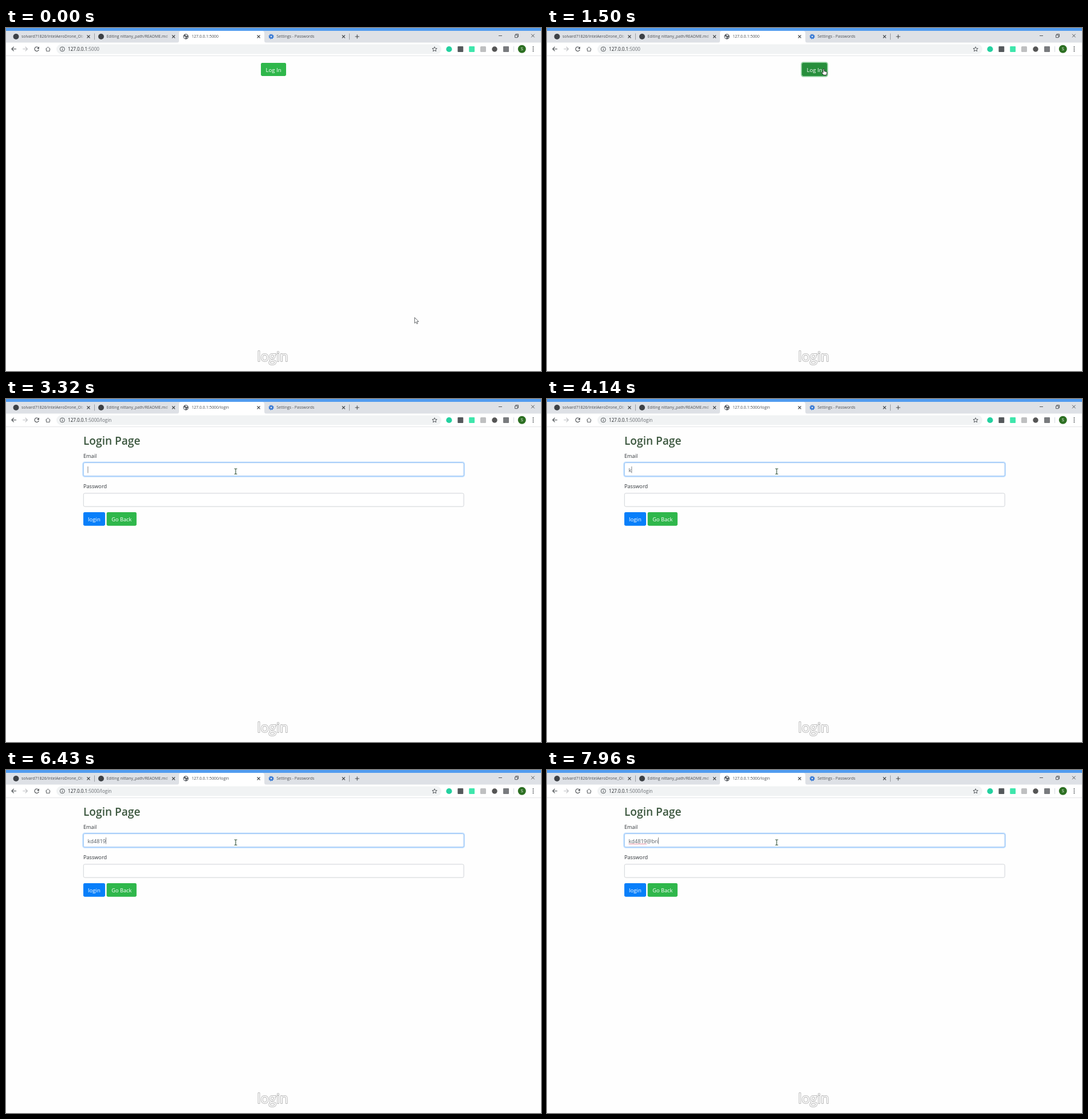
Animation, 934 px wide and 600 px high, one loop 8 s. Source, as an HTML page:

```html
<!DOCTYPE html>
<html lang="en">
<head>
<meta charset="utf-8">
<title>Login demo</title>
<style>
  html, body { margin: 0; width: 100%; height: 100%; overflow: hidden; background: #fefefe; }
  svg { display: block; font-family: "Open Sans", "Noto Sans", sans-serif; }
  text { white-space: pre; }
  .tab { font-size: 6.95px; fill: #4b4f54; }
  .url { font-size: 8.1px; fill: #6a6e73; }
  .label { font-size: 9.15px; fill: #2f3439; }
  .button { font-size: 9.6px; fill: #fff; }
  .typed { font-size: 9.25px; fill: #555c63; }
  .line { fill: none; stroke: #45494d; stroke-width: 1.1; }
  .field { fill: #fff; stroke: #cbcfd3; stroke-width: .9; }
  .caption { font-size: 23.8px; fill: #fff; stroke: #b9b9b9; stroke-width: 2; paint-order: stroke; stroke-linejoin: round; }
</style>
</head>
<body>
<svg width="934" height="600" viewBox="0 0 934 600">
  <defs>
    <linearGradient id="fade">
      <stop offset="0" stop-color="#dee1e6" stop-opacity="0"/>
      <stop offset="1" stop-color="#dee1e6"/>
    </linearGradient>
    <clipPath id="clip1"><path d="M20 5H135V25H20Z"/></clipPath>
    <clipPath id="clip2"><path d="M168 5H284V25H168Z"/></clipPath>
    <path id="cross" d="M-2.5-2.5 2.5 2.5M2.5-2.5-2.5 2.5" class="line"/>
  </defs>
  <rect width="934" height="600" fill="#fefefe"/>

  <!-- tab strip -->
  <rect width="934" height="26" fill="#dee1e6"/>
  <rect width="934" height="5" fill="#519cf0"/>
  <path d="M298 26Q302 26 302 22V9Q302 5 306 5H447Q451 5 451 9V22Q451 26 455 26Z" fill="#fff"/>
  <path d="M154.5 9.5V20.5M599.5 9.5V20.5" stroke="#9a9da2"/>
  <circle cx="17.5" cy="15" r="5" fill="#3d4146"/>
  <circle cx="166" cy="15" r="5" fill="#3d4146"/>
  <text class="tab" x="27" y="17.4" clip-path="url(#clip1)">solvard71826/IntelAeroDrone_Ob</text>
  <text class="tab" x="175.5" y="17.4" clip-path="url(#clip2)">Editing nittany_path/README.md</text>
  <path d="M129 8H136V22H129Z" fill="url(#fade)"/>
  <path d="M278 8H285V22H278Z" fill="url(#fade)"/>
  <g id="globe">
    <circle cx="314" cy="15" r="4.7" fill="#5a5e63"/>
    <path d="M310.3 14.5Q313 14 313.6 16T312 18.6Q310 17.3 310.3 14.5ZM313 11.3Q316 10.7 317 13L314.8 14.3 313.4 13ZM315.3 16.2 317.6 15.8 316 18.2Z" fill="#e8eaec"/>
  </g>
  <path id="spinner" d="M314 10.3A4.7 4.7 0 0 1 318.7 15" fill="none" stroke="#2f74dd" stroke-width="1.3"/>
  <text id="tabTitle" class="tab" x="324" y="17.4"></text>
  <g fill="none" stroke="#2f74d3">
    <circle cx="463" cy="15" r="2.5" stroke-width="2.1"/>
    <circle cx="463" cy="15" r="3.9" stroke-width="1.4" stroke-dasharray="1.53"/>
  </g>
  <text class="tab" x="472.3" y="17.4">Settings - Passwords</text>
  <use href="#cross" x="144" y="15"/><use href="#cross" x="292.5" y="15"/>
  <use href="#cross" x="441" y="15"/><use href="#cross" x="589.3" y="15"/>
  <path class="line" d="M609.5 15H616.7M613.1 11.4V18.6"/>
  <path class="line" style="stroke-width:.9" d="M860 13.5H866M888.5 12.2H893V16.7H888.5ZM889.8 12V10.7H894.4V15.3H893M917 10.7 922.6 16.3M922.6 10.7 917 16.3"/>

  <!-- toolbar -->
  <rect y="25.5" width="934" height="22.5" fill="#fff"/>
  <path d="M0 48.5H934" stroke="#e4e5e7"/>
  <rect x="88" y="28.5" width="672" height="17" rx="8.5" fill="#f1f3f4"/>
  <path class="line" d="M18 36.7H10.2M13.6 33 9.9 36.7 13.6 40.4"/>
  <path class="line" style="stroke:#b9bbbe" d="M29.3 36.7H37.2M33.7 33 37.4 36.7 33.7 40.4"/>
  <g id="reload">
    <path class="line" d="M56.6 34.5A3.7 3.7 0 1 0 57.2 37.8"/>
    <path d="M57.8 32.6V36.4H54Z" fill="#45494d"/>
  </g>
  <use id="stop" href="#cross" transform="translate(53.5 36.8) scale(1.25)"/>
  <path class="line" style="stroke-width:.9" d="M69.2 37 73.3 33.2 77.4 37M70.4 36.2V40.4H76.2V36.2"/>
  <circle class="line" style="stroke-width:.9" cx="98.3" cy="36.9" r="4"/>
  <path class="line" style="stroke-width:1" d="M98.3 36.3V39.2M98.3 34.4V35.4"/>
  <text class="url" x="108" y="39.9"><tspan fill="#24272b">127.0.0.1</tspan><tspan id="urlPath"></tspan></text>
  <path class="line" style="stroke-width:.9" d="M748.2 32.8 749.4 35.6 752.4 35.8 750.1 37.8 750.8 40.7 748.2 39.2 745.6 40.7 746.3 37.8 744 35.8 747 35.6Z"/>
  <circle cx="773.5" cy="37" r="5.1" fill="#24d1a0"/>
  <rect x="788.5" y="32" width="9.8" height="10" rx="1" fill="#55595c"/>
  <rect x="808.3" y="32" width="9.8" height="10" rx="1" fill="#3fe6ac"/>
  <rect x="828" y="32" width="10" height="10" rx="1.5" fill="#bfc0c1"/>
  <circle cx="853" cy="37" r="4.7" fill="#555"/>
  <rect x="868" y="32" width="10" height="10" rx="1" fill="#797b7e"/>
  <path d="M886.5 32V42" stroke="#d5d9df"/>
  <circle cx="900.7" cy="36.8" r="7" fill="#2d7023"/>
  <text x="900.7" y="39.4" text-anchor="middle" font-size="7.2" fill="#fff">S</text>
  <g fill="#45494d"><circle cx="920.4" cy="33.3" r="1"/><circle cx="920.4" cy="36.8" r="1"/><circle cx="920.4" cy="40.3" r="1"/></g>

  <!-- pages -->
  <g id="home">
    <rect id="homeRing" x="444.2" y="60.2" width="45.6" height="24.6" rx="3.2" fill="none" stroke="#28a745" stroke-width="1.9"/>
    <rect id="homeButton" x="445" y="61" width="44" height="23" rx="2.4"/>
    <text class="button" x="467" y="76.8" text-anchor="middle">Log In</text>
  </g>
  <g id="login">
    <text x="135" y="80.3" font-size="19.1" font-weight="600" fill="#3c573f">Login Page</text>
    <text class="label" x="135" y="103.2">Email</text>
    <rect id="emailRing" x="134.2" y="110.4" width="666" height="25.4" rx="3.3" fill="none" stroke="#bfdeff" stroke-width="1.9"/>
    <rect id="email" class="field" x="135.3" y="111.5" width="663.9" height="23.2" rx="2.4"/>
    <text id="typed" class="typed" x="142.6" y="127.5"></text>
    <path id="misspelt" fill="none" stroke="#e0708a" stroke-width=".8"/>
    <path id="caret" fill="none" stroke="#4a5056" stroke-width=".7"/>
    <text class="label" x="135" y="156.4">Password</text>
    <rect class="field" x="135.3" y="164.9" width="663.9" height="23.2" rx="2.4"/>
    <rect x="135" y="198" width="38" height="23.7" rx="2.4" fill="#087ffa"/>
    <text class="button" x="154" y="214" text-anchor="middle">login</text>
    <rect x="175.7" y="198" width="52.2" height="23.7" rx="2.4" fill="#2fb74b"/>
    <text class="button" style="font-size:9.25px" x="201.8" y="214" text-anchor="middle">Go Back</text>
  </g>

  <text class="caption" x="465.5" y="582.6" text-anchor="middle">login</text>

  <!-- pointers, with the hot spot at 0,0 -->
  <path id="arrow" d="M.4.4V10.4L2.7 8.2 4.2 11.6 5.8 10.9 4.4 7.6H7.4Z" fill="#fff" stroke="#55585c" stroke-width=".9"/>
  <path id="hand" d="M-1 1Q0-.6 1 1V4.5L4.8 5.4Q6 5.9 5.8 7.3L5 11.2H-.2L-3.2 7.5Q-3.2 5.9-1.8 6.4L-1 7.2Z" fill="#fff" stroke="#222" stroke-width=".9"/>
  <path id="beam" d="M-2.5-4.6H-.8L0-4 .8-4.6H2.5M0-4V4M-2.5 4.6H-.8L0 4 .8 4.6H2.5" fill="none" stroke="#34543a" stroke-width="1.1"/>
</svg>
<script>
const LOOP = 8000;
const BUSY_FROM = 1600, LOGIN_AT = 1740, BUSY_TO = 2600;
const CLICK_AT = 1330, FOCUS_AT = 2960;

// time, x, y of the pointer; eased between neighbours
const PATH = [
  [0, 713, 506], [160, 713, 506], [840, 486, 83], [1200, 483, 71],
  [1800, 483, 71], [2300, 455, 98], [2470, 455, 98], [2850, 401, 126.6]
];
const ADDRESS = "kd4819@bri";
const KEY_TIMES = [4080, 4300, 4650, 5300, 5620, 6020, 6850, 7300, 7520, 7720];
const TEXT_LEFT = 142.6;

const el = id => document.getElementById(id);
const show = (id, on) => el(id).style.display = on ? "" : "none";
const set = (id, name, value) => el(id).setAttribute(name, value);
const ramp = (t, start, length) => Math.min(1, Math.max(0, (t - start) / length));
const smooth = k => k * k * (3 - 2 * k);

function pointerAt(t) {
  const i = PATH.findIndex(point => point[0] > t);
  if (i < 0) return PATH[PATH.length - 1].slice(1);
  const [t0, x0, y0] = PATH[i - 1], [t1, x1, y1] = PATH[i];
  const k = smooth(ramp(t, t0, t1 - t0));
  return [x0 + (x1 - x0) * k, y0 + (y1 - y0) * k];
}

function drawChrome(t, onLogin) {
  const busy = t >= BUSY_FROM && t < BUSY_TO;
  const path = ":5000" + (onLogin ? "/login" : "");
  el("tabTitle").textContent = "127.0.0.1" + path;
  el("urlPath").textContent = path;
  show("globe", !busy);
  show("spinner", busy);
  show("reload", !busy);
  show("stop", busy);
  set("spinner", "transform", `rotate(${(t - 2430) * 0.36} 314 15)`);
}

function drawEmail(t) {
  const focus = ramp(t, FOCUS_AT, 150);
  set("emailRing", "opacity", focus);
  el("email").style.stroke = focus > 0.5 ? "#8dbdf3" : "";

  const count = KEY_TIMES.filter(time => time <= t).length;
  const text = el("typed");
  text.textContent = ADDRESS.slice(0, count);
  const end = TEXT_LEFT + (count ? text.getComputedTextLength() : 0) + 0.4;
  const lastAction = count ? KEY_TIMES[count - 1] : FOCUS_AT;
  set("caret", "d", `M${end} 118V129.5`);
  show("caret", t >= FOCUS_AT && (t - lastAction) % 1000 < 500);

  const at = ADDRESS.indexOf("@");
  const flagged = count > at;
  show("misspelt", flagged);
  if (flagged) set("misspelt", "d", `M${TEXT_LEFT} 129.4h${text.getSubStringLength(0, at)}`);
}

function draw(t) {
  const onLogin = t >= LOGIN_AT;
  const [x, y] = pointerAt(t);
  const overButton = !onLogin && x > 445 && x < 489 && y > 61 && y < 84;
  const overField = onLogin && y > 111 && y < 135;

  drawChrome(t, onLogin);
  show("home", !onLogin);
  show("login", onLogin);
  set("homeButton", "fill", overButton ? "#278f3c" : "#2fb74b");
  set("homeRing", "opacity", 0.5 * ramp(t, CLICK_AT, 150));
  if (onLogin) drawEmail(t);

  const pointer = overButton ? "hand" : overField ? "beam" : "arrow";
  for (const id of ["arrow", "hand", "beam"]) show(id, id === pointer);
  set(pointer, "transform", `translate(${x} ${y})`);
}

const start = performance.now();
function tick() {
  draw((performance.now() - start) % LOOP);
  requestAnimationFrame(tick);
}
tick();
</script>
</body>
</html>
```
